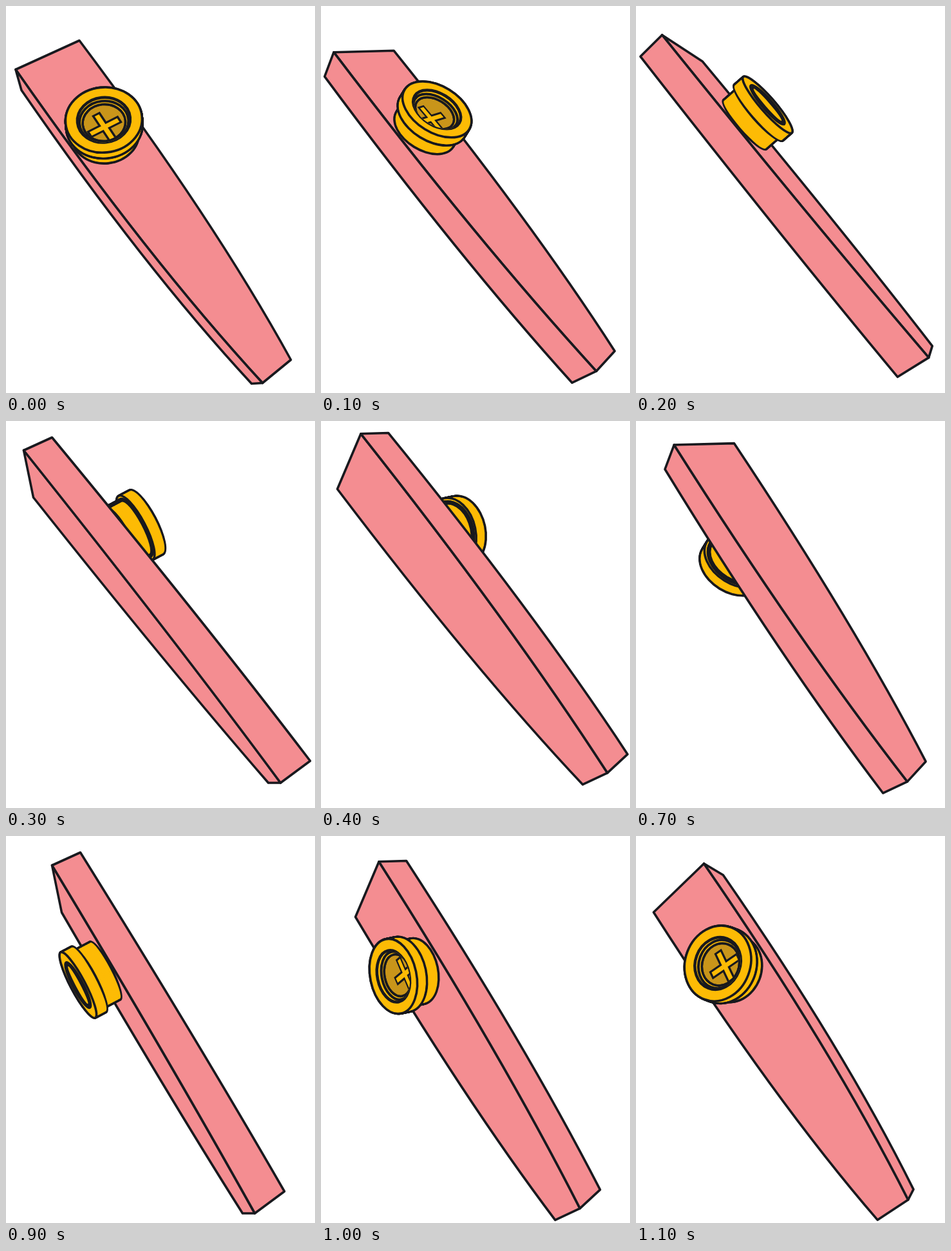
Recreate the animation shown at these times as an HTML page with a canvas. Size 480 px wide and 600 px high, loop 1.2 s.

```html
<!DOCTYPE html>
<html lang="en">
<head>
<meta charset="utf-8">
<title>Turning kazoo</title>
<style>
  html, body { margin: 0; width: 100%; height: 100%; overflow: hidden; background: #fff; }
  canvas { display: block; }
</style>
</head>
<body>
<canvas id="stage" width="480" height="600"></canvas>
<script>
const ctx = document.getElementById('stage').getContext('2d');
const INK = '#18191e', PINK = '#f48d91', GOLD = '#fdbb05', BRONZE = '#c9951a';
const LINE = 3.6, LOOP = 1200, POSES = 12;

// A point or vector swinging on an ellipse: rest + cos part + sin part.
const swing = (rest, cos, sin) => turn =>
  rest.map((r, k) => r + cos[k] * Math.cos(turn) + sin[k] * Math.sin(turn));

// Each end of the box: its middle, the span across the top, the span down a side.
const HEAD = {
  mid: swing([79, 72], [-10, 20], [-22, 0]),
  across: swing([0, 0], [99, -45], [15, 73]),
  down: swing([0, 0], [9, 32], [-44, 20])
};
const TAIL = {
  mid: swing([420, 556], [-8, 11], [20, -12]),
  across: swing([0, 0], [44, -36], [-19, 0]),
  down: swing([0, 0], [-17, 1], [-46, 34])
};

// Corners in order around the box, as signs along across and down.
const CORNERS = [[-1, -1], [1, -1], [1, 1], [-1, 1]];
const BULGE = 0.25, CAP_AT = 0.252;

const add = (p, q, k = 1) => [p[0] + q[0] * k, p[1] + q[1] * k];
const mix = (p, q, k) => [p[0] + (q[0] - p[0]) * k, p[1] + (q[1] - p[1]) * k];

function corner(end, turn, a, d) {
  return add(add(end.mid(turn), end.across(turn), a / 2), end.down(turn), d / 2);
}

function paint(fill, width = LINE) {
  ctx.fillStyle = fill;
  ctx.fill();
  ctx.lineWidth = width;
  ctx.strokeStyle = INK;
  ctx.stroke();
}

function drawBody(turn) {
  const axis = add(TAIL.mid(turn), HEAD.mid(turn), -1);
  const spread = mix(HEAD.across(turn), TAIL.across(turn), 0.5);
  const edges = CORNERS.map(([a, d]) => {
    const from = corner(HEAD, turn, a, d), to = corner(TAIL, turn, a, d);
    const bend = add(mix(from, to, 0.58), spread, a * BULGE);
    const centre = mix(from, to, 0.5);
    return { from, to, bend, offset: centre[0] * axis[1] - centre[1] * axis[0] };
  });
  edges.forEach((left, i) => {
    const right = edges[(i + 1) % edges.length];
    if (right.offset <= left.offset) return; // faces away
    ctx.beginPath();
    ctx.moveTo(...left.from);
    ctx.quadraticCurveTo(...left.bend, ...left.to);
    ctx.lineTo(...right.to);
    ctx.quadraticCurveTo(...right.bend, ...right.from);
    ctx.closePath();
    paint(PINK);
  });
}

// How far the top of the kazoo looks at the viewer, from -1 to 1.
const facing = turn => -0.04 + 0.92 * Math.cos(turn + Math.PI / 12);

function drawCap(turn) {
  const look = facing(turn);
  const base = mix(corner(HEAD, turn, 0, -1), corner(TAIL, turn, 0, -1), CAP_AT);
  const depth = mix(HEAD.down(turn), TAIL.down(turn), CAP_AT).map(n => n * 0.95);
  const rim = add(base, depth, -1);
  const rx = 57 + 3 * look, ry = rx * Math.abs(look);
  const tilt = Math.atan2(-depth[0], depth[1]);

  // Ellipse at a place along the axis, 0 at the rim and 1 at the base.
  function oval(place, scale, squash = scale, grow = 0) {
    ctx.beginPath();
    ctx.ellipse(...add(rim, depth, place), rx * scale + grow, ry * squash + grow, tilt, 0, 7);
  }

  function tube(from, to, scale, fill, line = LINE) {
    const steps = 30;
    for (const [grow, colour] of [[line / 2, INK], [-line / 2, fill]]) {
      ctx.fillStyle = colour;
      for (let i = 0; i <= steps; i++) {
        oval(from + (to - from) * i / steps, scale, scale, grow);
        ctx.fill();
      }
    }
    oval(to, scale);
    paint(fill, line);
  }

  function cross() {
    ctx.translate(...add(rim, depth, 0.47));
    ctx.rotate(tilt);
    ctx.scale(1, ry / rx);
    ctx.rotate(-Math.PI / 6 - tilt);
    for (const [half, width, colour] of [[28, 14.5, INK], [24.5, 7.5, GOLD]]) {
      ctx.beginPath();
      ctx.moveTo(-half, 0);
      ctx.lineTo(half, 0);
      ctx.moveTo(0, -half);
      ctx.lineTo(0, half);
      ctx.lineWidth = width;
      ctx.strokeStyle = colour;
      ctx.stroke();
    }
  }

  if (look < 0) {
    const fill = look < -0.85 ? INK : GOLD; // in shade when seen from behind
    tube(0, 0.4, 1, fill);
    tube(0.4, 1, 0.87, fill, 7);
    return;
  }

  tube(1, 0.4, 0.88, GOLD);
  tube(0.4, 0, 1, GOLD);
  oval(0, 0.69);
  if (look < 0.35) {
    paint(INK);
    oval(0, 0.57, 0.3);
    ctx.fillStyle = GOLD;
    ctx.fill();
    return;
  }
  paint(GOLD, 4.5);
  ctx.save();
  ctx.clip();
  oval(0.13, 0.64);
  paint(GOLD, 4);
  oval(0.19, 0.53);
  paint(BRONZE, LINE * 2);
  ctx.clip();
  ctx.fill();
  cross();
  ctx.restore();
}

function draw(turn) {
  ctx.fillStyle = '#fff';
  ctx.fillRect(0, 0, 480, 600);
  ctx.lineJoin = 'round';
  const layers = facing(turn) < 0 ? [drawCap, drawBody] : [drawBody, drawCap];
  layers.forEach(layer => layer(turn));
}

function tick() {
  const pose = Math.floor(performance.now() % LOOP / LOOP * POSES);
  draw(pose / POSES * 2 * Math.PI);
  requestAnimationFrame(tick);
}
tick();
</script>
</body>
</html>
```
